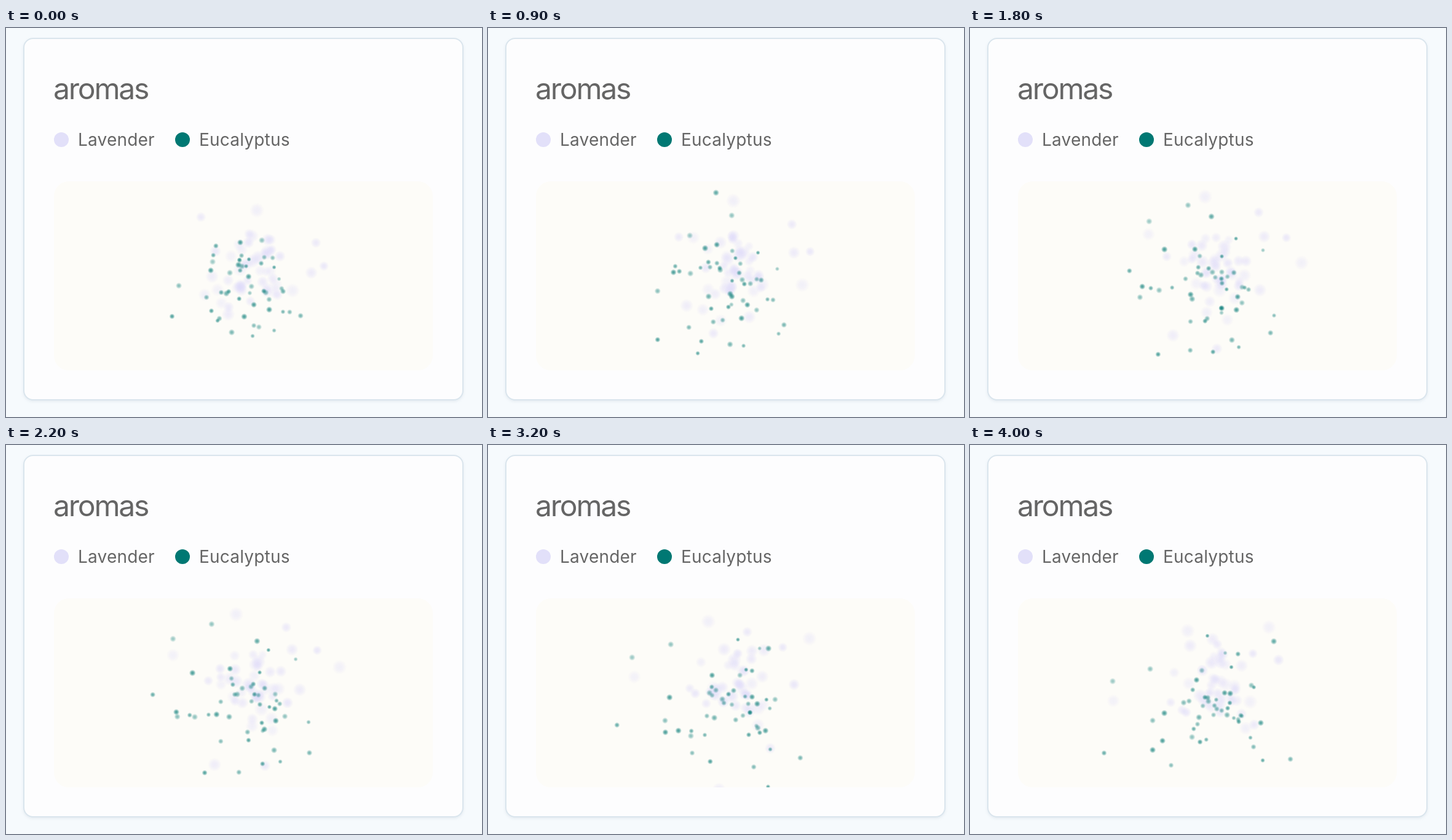
An HTML page with a canvas that plays this animation: 774x634 px, repeating every 4.1 s.

```html
<!DOCTYPE html>
<html lang="en">
<head>
<meta charset="utf-8">
<title>aromas</title>
<style>
  html, body { margin: 0; width: 100%; height: 100%; overflow: hidden; background: #f6fafd; }
  svg, canvas { position: absolute; left: 0; top: 0; display: block; }
  .card { filter: drop-shadow(0 2px 2px rgba(60, 90, 120, .09)); }
  text { font-family: Inter, "Liberation Sans", sans-serif; fill: #656565; }
  .title { font-size: 48px; letter-spacing: -2.2px; }
  .label { font-size: 28px; letter-spacing: .2px; }
</style>
</head>
<body>
<svg width="774" height="634" viewBox="0 0 774 634">
  <rect class="card" x="29" y="17" width="714" height="589" rx="15" fill="#fdfdfe" stroke="#dae5ed" stroke-width="2"/>
  <text class="title" x="77" y="116">aromas</text>
  <circle cx="90" cy="182" r="12" fill="#e2e0f9"/>
  <text class="label" x="117" y="192">Lavender</text>
  <circle cx="287" cy="182" r="12" fill="#007873"/>
  <text class="label" x="314" y="192">Eucalyptus</text>
  <rect x="78" y="250" width="616" height="308" rx="24" fill="#fdfcf8"/>
</svg>
<canvas id="stage" width="774" height="634"></canvas>
<script>
const ctx = document.getElementById('stage').getContext('2d');
const STEP = 100, STEPS = 41, TRAVEL = 4000;

// Wide drifters: start x, y, end x, y, total turn in degrees
const eucalyptusPaths = [
  [479, 469, 521, 512, 92], [350, 431, 218, 502, 180], [336, 381, 232, 385, 211],
  [270, 470, 374, 484, 190], [334, 461, 419, 429, 248], [326, 439, 461, 492, 175],
  [344, 477, 476, 514, 200], [372, 224, 494, 320, 138], [416, 346, 293, 365, 188],
  [436, 493, 429, 445, 275], [281, 420, 297, 449, 155], [378, 386, 316, 437, 224],
  [333, 395, 313, 482, 184], [428, 459, 297, 497, 130], [436, 390, 386, 311, 102],
  [444, 409, 415, 339, 208], [403, 485, 327, 522, 125], [364, 399, 361, 476, 222],
  [403, 451, 414, 404, 200], [395, 377, 425, 362, 30], [401, 502, 456, 477, 186],
  [367, 496, 418, 440, 217]
];
const lavenderPaths = [
  [466, 428, 486, 297, 180], [366, 372, 233, 417, 160], [408, 297, 354, 303, 170],
  [335, 405, 415, 580, 100], [362, 455, 462, 456, 215], [517, 388, 460, 340, 170],
  [504, 350, 402, 325, 150]
];

let seed = 20;
function random() {
  seed = (seed * 16807) % 2147483647;
  return seed / 2147483647;
}
const between = (a, b) => a + (b - a) * random();
const bell = () => (random() + random() + random() + random() - 2) * 1.7;

// A drifter that stays near the middle of the cloud
function innerPath(cx, cy, spread) {
  return [
    cx - 8 + bell() * spread, cy + bell() * spread,
    cx + 8 + bell() * spread, cy + bell() * spread,
    between(120, 215)
  ];
}

function makeCloud(paths, innerCount, cx, cy, spread, rgb, radius, alpha) {
  const all = paths.slice();
  while (all.length < paths.length + innerCount) all.push(innerPath(cx, cy, spread));
  return all.map(path => ({
    path, rgb,
    radius: between(...radius),
    alpha: between(...alpha)
  }));
}

const particles = [
  ...makeCloud(lavenderPaths, 42, 401, 399, 38, '220,216,249', [8, 12.5], [.3, .58]),
  ...makeCloud(eucalyptusPaths, 28, 392, 413, 34, '0,120,115', [3.6, 5.4], [.4, .72])
];

// Point on a counterclockwise circular arc, travelled at constant speed
function pointOnArc([x0, y0, x1, y1, degrees], u) {
  const half = degrees * Math.PI / 360;
  const scale = Math.sin(half * u) / Math.sin(half);
  const c = Math.cos(half * (1 - u)) * scale;
  const s = Math.sin(half * (1 - u)) * scale;
  const dx = x1 - x0, dy = y1 - y0;
  return [x0 + dx * c - dy * s, y0 + dx * s + dy * c];
}

function drawParticle({ path, rgb, radius, alpha }, u) {
  const [x, y] = pointOnArc(path, u);
  const glow = ctx.createRadialGradient(x, y, 0, x, y, radius);
  glow.addColorStop(0, `rgba(${rgb},${alpha})`);
  glow.addColorStop(.4, `rgba(${rgb},${alpha * .8})`);
  glow.addColorStop(1, `rgba(${rgb},0)`);
  ctx.fillStyle = glow;
  ctx.fillRect(x - radius, y - radius, radius * 2, radius * 2);
}

ctx.beginPath();
ctx.roundRect(78, 250, 616, 308, 24);
ctx.clip();

const start = performance.now();
function frame() {
  const step = Math.floor(Math.max(0, performance.now() - start) / STEP) % STEPS;
  ctx.clearRect(0, 0, 774, 634);
  for (const particle of particles) drawParticle(particle, step * STEP / TRAVEL);
  requestAnimationFrame(frame);
}
frame();
</script>
</body>
</html>
```
